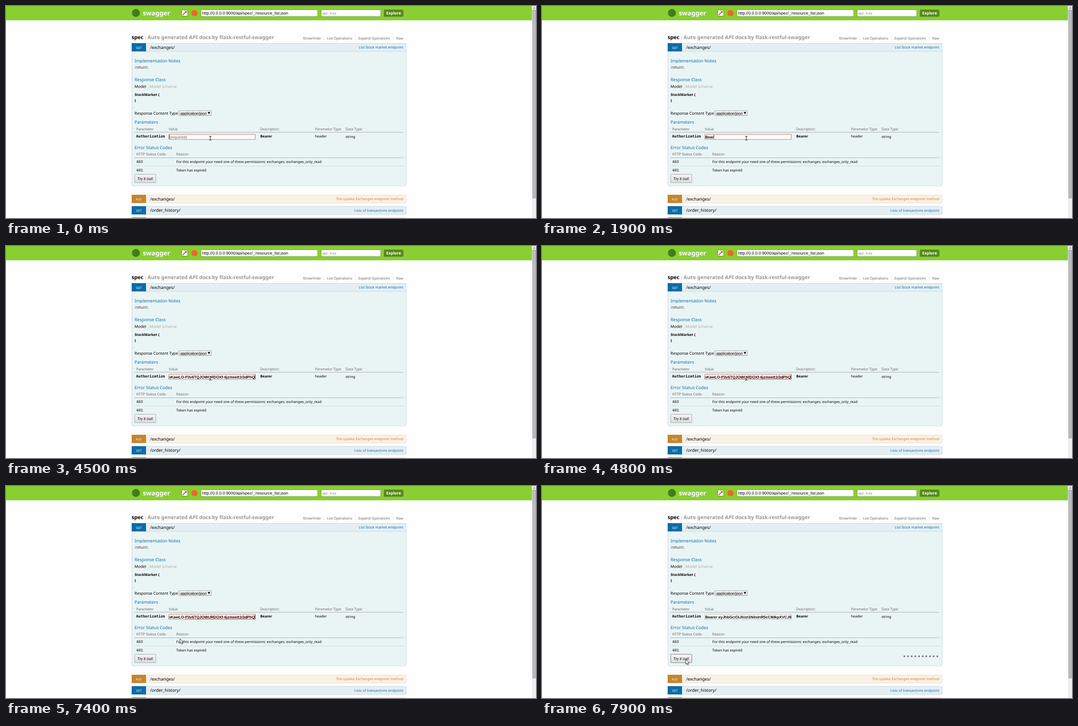
These frames come from a looping animation (1181 by 474 pixels, 8 s). An HTML page with a canvas:

```html
<!DOCTYPE html>
<html lang="en">
<head>
<meta charset="utf-8">
<title>API explorer</title>
<style>
html, body { margin: 0; width: 100%; height: 100%; overflow: hidden; background: #fdfefd; }
canvas { display: block; }
</style>
</head>
<body>
<canvas id="stage" width="1181" height="474"></canvas>
<script>
const ctx = document.getElementById('stage').getContext('2d');
const LOOP = 8000;
const SANS = '"Noto Sans", sans-serif';
const ARIAL = '"Liberation Sans", Arial, sans-serif';
const MONO = '"DejaVu Sans Mono", monospace';
const BLUE = '#0b6ca8', ORANGE = '#c5862f', GREY = '#666', BLACK = '#000';
const SMALL = 7.87, MEDIUM = 8.8, LARGE = 9.65;

const KEY_TIMES = [500, 1000, 1500, 1900, 2400, 2800, 3600];
const PREFIX = 'Bearer ';
const TOKEN_HEAD = 'eyJhbGciOiJIUzI1NiIsInR5cCI6IkpXVCJ9';
const TOKEN_TAIL = 'oKawLO-P3v6TQJOWURDOXf-6jzmeeIt1I3dPhQ';
const PASTE = 4500, SPELLCHECK = 4800, MOVE = 7000, ARRIVE = 7800, SUBMIT = 7900;

function text(str, x, y, size, color = BLACK, { bold = false, font = SANS, align = 'left' } = {}) {
  ctx.font = `${bold ? 'bold ' : ''}${size}px ${font}`;
  ctx.textAlign = align;
  ctx.fillStyle = color;
  ctx.fillText(str, x, y);
}

function box(x, y, w, h, fill, stroke, radius = 0) {
  ctx.beginPath();
  ctx.roundRect(x, y, w, h, radius);
  ctx.fillStyle = fill;
  ctx.fill();
  if (stroke) {
    ctx.strokeStyle = stroke;
    ctx.lineWidth = 1;
    ctx.stroke();
  }
}

function disc(x, y, r, color) {
  ctx.fillStyle = color;
  ctx.beginPath();
  ctx.arc(x, y, r, 0, 7);
  ctx.fill();
}

function rule(y, color) {
  ctx.fillStyle = color;
  ctx.fillRect(286.5, y, 599, 0.8);
}

function verticalFade(y, h, top, bottom) {
  const fade = ctx.createLinearGradient(0, y, 0, y + h);
  fade.addColorStop(0, top);
  fade.addColorStop(1, bottom);
  return fade;
}

function drawHeader() {
  box(0, 0, 1172, 32, '#89ce33');
  disc(289.5, 15.5, 9, '#467a22');
  text('swagger', 305, 20.5, 14.3, '#fff', { bold: true });

  box(391.5, 9, 13.5, 13.5, '#fff', '#4f8420', 2);
  ctx.strokeStyle = '#d8562f';
  ctx.lineWidth = 2;
  ctx.beginPath();
  ctx.moveTo(395, 19);
  ctx.lineTo(401, 13);
  ctx.stroke();
  disc(395, 19, 1.5, '#d8562f');
  disc(401, 13, 2, '#d8562f');
  disc(420, 16, 7, '#f0682c');

  box(434.5, 8.5, 260, 15, '#fff', '#7aa64a');
  text('http://0.0.0.0:9000/api/spec/_/resource_list.json', 437, 19, 9.17, BLACK, { font: ARIAL });
  box(702.5, 8.5, 132.5, 15, '#fff', '#7aa64a');
  text('api_key', 704.5, 19, 9.17, '#999', { font: ARIAL });
  box(842, 8, 43.5, 16, '#568a20', null, 2.5);
  text('Explore', 863.7, 19.2, 8.85, '#fff', { bold: true, align: 'center' });
}

function drawScrollbar() {
  box(1172, 0, 9, 474, '#eeeeee');
  box(1173.5, 8.5, 7, 421, '#bcbcbc', '#a9a9a9');
  ctx.fillStyle = '#777';
  ctx.beginPath();
  ctx.moveTo(1174.5, 5.5);
  ctx.lineTo(1177, 2.5);
  ctx.lineTo(1179.5, 5.5);
  ctx.fill();
}

function drawOperation(y, method, path, summary, color, fill, border) {
  box(280.5, y, 611, 18, fill, border);
  box(280, y - 0.5, 32, 18.5, color);
  text(method, 296, y + 12, 6.8, '#fff', { align: 'center' });
  text(path, 321, y + 12.2, LARGE);
  text(summary, 885, y + 11.7, SMALL, color, { align: 'right' });
}

function drawPage() {
  box(0, 0, 1181, 474, '#fdfefd');
  drawHeader();
  drawScrollbar();

  text('spec', 280, 74, 11.6, BLACK, { bold: true });
  text(': Auto generated API docs by flask-restful-swagger', 309, 74, 11.45, '#999', { bold: true });
  text('Show/Hide', 661.5, 74.5, SMALL, GREY);
  text('List Operations', 715.5, 74.5, SMALL, GREY);
  text('Expand Operations', 785, 74.5, SMALL, GREY);
  text('Raw', 885, 74.5, SMALL, GREY, { align: 'right' });
  for (const x of [708.5, 778, 862]) box(x, 67, 0.7, 9, '#ddd');

  box(280.5, 101.5, 611, 300.5, '#e9f4f5', '#c3d9e2', [0, 0, 4, 4]);
  const get = [BLUE, '#e4eff3', '#c3d9e2'];
  drawOperation(83.5, 'GET', '/exchanges/', 'List Stock market endpoint', ...get);
  drawOperation(422.5, 'PUT', '/exchanges/', 'The update Exchanges endpoint method', ORANGE, '#f9f1e6', '#eedfc8');
  drawOperation(448, 'GET', '/order_history/', 'Lists of transactions endpoint', ...get);
  drawOperation(473.5, '', '', '', ...get);

  text('Implementation Notes', 286.5, 126.3, LARGE, BLUE);
  text(':return:', 286.5, 140.2, MEDIUM, '#333');
  text('Response Class', 286.5, 167.5, LARGE, BLUE);
  text('Model', 286.5, 183.2, 8.7);
  box(316, 174.5, 0.7, 12, '#ccc');
  text('Model Schema', 319.7, 183.2, 8.7, '#aaa');
  text('StockMarket {', 286.5, 201, SMALL, BLACK, { bold: true });
  text('}', 286.5, 214.3, SMALL, BLACK, { bold: true });

  text('Response Content Type', 286.5, 242.5, 8.75);
  box(385.5, 234, 72, 11, verticalFade(234, 11, '#f5f5f5', '#dedede'), '#a0a0a0', 1);
  text('application/json', 388.5, 242.5, 8.49, BLACK, { font: ARIAL });
  ctx.beginPath();
  ctx.moveTo(449.5, 237);
  ctx.lineTo(455, 237);
  ctx.lineTo(452.25, 241.5);
  ctx.fill();

  text('Parameters', 286.5, 263.3, LARGE, BLUE);
  text('Parameter', 290, 277.7, SMALL, GREY);
  text('Value', 362.5, 277.7, SMALL, GREY);
  text('Description', 566, 277.7, SMALL, GREY);
  text('Parameter Type', 688.5, 277.7, SMALL, GREY);
  text('Data Type', 756.5, 277.7, SMALL, GREY);
  rule(281.8, '#999');
  text('Authorization', 290, 294, 8.25, BLACK, { bold: true, font: MONO });
  text('Bearer', 566.5, 294.3, SMALL, BLACK, { bold: true });
  text('header', 688.5, 294.3, SMALL);
  text('string', 756.5, 295.4, SMALL);

  text('Error Status Codes', 286.5, 320.3, LARGE, BLUE);
  text('HTTP Status Code', 290, 334.3, SMALL, GREY);
  text('Reason', 379.5, 334.3, SMALL, GREY);
  rule(338.8, '#999');
  text('403', 290.3, 351.3, 8.15, BLACK, { font: MONO });
  text('For this endpoint your need one of these permissions: exchanges, exchanges_only_read', 379.5, 351.2, SMALL);
  rule(357.5, '#c4cccd');
  text('401', 290.3, 369.8, 8.15, BLACK, { font: MONO });
  text('Token has expired', 379.5, 369.5, SMALL);
}

function drawField(t) {
  const submitted = t >= SUBMIT, pasted = t >= PASTE;
  const style = { bold: true, font: ARIAL };
  const baseline = 295.6, left = 363.7, right = 554.3;
  box(363, 286.8, 192.5, 11.4, '#fff', submitted ? '#b5b5b5' : '#d8604c');
  ctx.save();
  ctx.beginPath();
  ctx.rect(363.3, 286, 192, 13);
  ctx.clip();
  let caret = left;
  if (submitted) {
    text(PREFIX + TOKEN_HEAD, left, baseline, 8.49, BLACK, style);
  } else if (pasted) {
    text(TOKEN_TAIL, right, baseline, 8.49, BLACK, { ...style, align: 'right' });
    caret = right;
    if (t >= SPELLCHECK) {
      ctx.fillStyle = '#e0473c';
      for (let x = 399; x < right; x += 2) ctx.fillRect(x, 296.4, 1.3, 1);
    }
  } else {
    const typed = PREFIX.slice(0, KEY_TIMES.filter(key => t >= key).length);
    text(typed || '(required)', left, baseline, 8.49, typed ? BLACK : '#888', style);
    if (typed) caret += ctx.measureText(typed).width;
  }
  if (!submitted) box(caret, 288, 0.8, 9, BLACK);
  ctx.restore();
}

function drawButton(hover) {
  const fill = verticalFade(376, 19, hover ? '#f8f8f8' : '#f5f5f5', '#dddddd');
  box(286.8, 376.2, 47, 18.8, fill, hover ? '#777' : '#a5a5a5', 1);
  text('Try it out!', 310.2, 388.7, 8.49, BLACK, { font: ARIAL, align: 'center' });
}

function drawIBeam(x, y) {
  ctx.beginPath();
  ctx.moveTo(x - 2.5, y - 4.5);
  ctx.quadraticCurveTo(x, y - 4.5, x, y - 3);
  ctx.quadraticCurveTo(x, y - 4.5, x + 2.5, y - 4.5);
  ctx.moveTo(x, y - 3);
  ctx.lineTo(x, y + 3);
  ctx.moveTo(x - 2.5, y + 4.5);
  ctx.quadraticCurveTo(x, y + 4.5, x, y + 3);
  ctx.quadraticCurveTo(x, y + 4.5, x + 2.5, y + 4.5);
  for (const [color, width] of [['#fff', 2.4], ['#111', 1.1]]) {
    ctx.strokeStyle = color;
    ctx.lineWidth = width;
    ctx.stroke();
  }
}

function drawArrow(x, y) {
  const outline = [[0, 0], [0, 10.5], [2.5, 8.3], [4.2, 12], [6, 11.2], [4.4, 7.6], [7.6, 7.4]];
  ctx.beginPath();
  for (const [dx, dy] of outline) ctx.lineTo(x + dx, y + dy);
  ctx.closePath();
  ctx.fillStyle = '#fff';
  ctx.fill();
  ctx.strokeStyle = '#111';
  ctx.lineWidth = 0.9;
  ctx.stroke();
}

function pointerAt(t) {
  const step = Math.floor(t / 100) * 100;
  const p = Math.min(1, Math.max(0, (step - MOVE) / (ARRIVE - MOVE)));
  const ease = p * p * (3 - 2 * p);
  return { x: 455.3 - 135 * ease, y: 295.5 + 92.5 * ease, p };
}

function draw(now) {
  const t = now % LOOP;
  const { x, y, p } = pointerAt(t);
  drawPage();
  drawField(t);
  drawButton(p === 1);
  if (t >= SUBMIT) for (let i = 0; i < 10; i++) disc(807.5 + i * 8.15, 380.7, 2, '#77797a');
  if (p < 0.2) drawIBeam(x, y);
  else drawArrow(x, y);
  requestAnimationFrame(draw);
}

ctx.textRendering = 'geometricPrecision';
requestAnimationFrame(draw);
</script>
</body>
</html>
```
